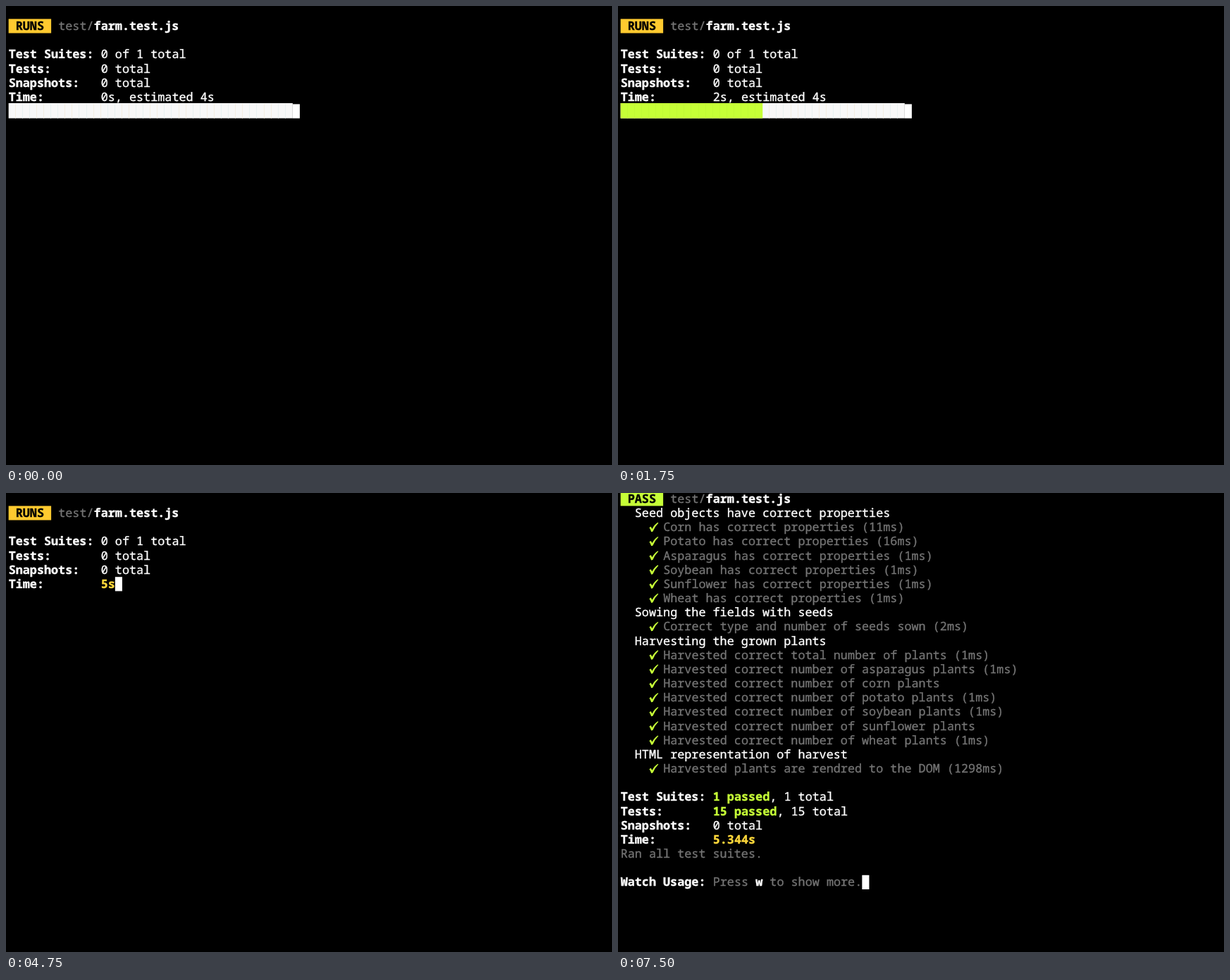
Recreate the animation shown at these times as an HTML page. Size 860 px wide and 652 px high, loop 8 s.

```html
<!DOCTYPE html>
<html lang="en">
<head>
<meta charset="utf-8">
<title>Test run</title>
<style>
  html, body { margin: 0; width: 100%; height: 100%; overflow: hidden; background: #000; }
  svg { display: block; width: 100vw; height: 100vh; color: #fff; }
  text { font: 16.8px "Noto Sans Mono", "DejaVu Sans Mono", monospace;
         fill: currentColor; stroke: currentColor; stroke-width: .35px;
         text-rendering: geometricPrecision; font-variant-ligatures: none; white-space: pre; }
  .b { font-weight: 700; }
  .dim { color: #747474; }
  .green { color: #c6ff37; }
  .yellow { color: #ffd83b; }
  .ink { color: #000; }
</style>
</head>
<body>
<svg id="term" viewBox="0 0 860 652"></svg>
<script>
const LOOP = 8000, CELL = 10.08, LINE = 20.17, LEFT = 3.65, TOP = -1.8, ASCENT = 15.7;
const GREEN = '#c6ff37', YELLOW = '#ffca2f';
const TICK = 'M.4 10.8L2.6 9.2L4.5 12.4Q7.6 6.4 12.6 3.3L13.3 4.1Q8.2 9.2 5.4 16.1L3.2 16.6Q2.2 13 .4 10.8Z';
const term = document.getElementById('term');

const colX = c => LEFT + c * CELL;
const rowY = r => TOP + r * LINE;

const text = (col, row, str, cls = '') =>
  `<text class="${cls}" x="${colX(col).toFixed(2)}" y="${(rowY(row) + ASCENT).toFixed(2)}">${str}</text>`;
const rect = (x, y, w, h, fill) =>
  `<rect x="${x.toFixed(2)}" y="${y.toFixed(2)}" width="${w.toFixed(2)}" height="${h.toFixed(2)}" fill="${fill}"/>`;
const cells = (col, row, n, fill) => rect(colX(col), rowY(row), n * CELL, LINE, fill);
const cursor = (col, row) => cells(col, row, 1, '#fff');
const check = (col, row) =>
  `<path d="${TICK}" fill="${GREEN}" transform="translate(${colX(col).toFixed(2)} ${rowY(row).toFixed(2)})"/>`;

const header = (row, label, fill) =>
  cells(0, row, 6, fill) + text(1, row, label, 'b ink') +
  text(7, row, 'test/', 'dim') + text(12, row, 'farm.test.js', 'b');

const labels = row => ['Test Suites:', 'Tests:', 'Snapshots:', 'Time:']
  .map((s, i) => text(0, row + i, s, 'b')).join('');

function progress(done) {
  const y = 138, h = 21.5;
  let out = rect(LEFT, y, 40 * CELL, h, '#f8f8f8');
  if (done) out += rect(LEFT, y, done * CELL, h, GREEN);
  // faint seams between the block characters
  for (let i = 1; i < 40; i++) {
    const seam = i < done ? '#c0fa36' : i % 4 < 2 ? '#f4eee3' : '#e9f1f1';
    if (i !== done) out += rect(Math.round(colX(i)) - 1, y + 1, 1, h - 1, seam);
  }
  return out + cursor(40, 7);
}

function running(sec) {
  const out = header(1, 'RUNS', YELLOW) + labels(3) +
    text(13, 3, '0 of 1 total') + text(13, 4, '0 total') + text(13, 5, '0 total');
  if (sec < 4) return out + text(13, 6, sec + 's, estimated 4s') + progress(sec * 10);
  return out + text(13, 6, sec + 's', sec > 4 ? 'b yellow' : '') + cursor(15, 6);
}

const prop = (name, ms) => `${name} has correct properties (${ms}ms)`;
const crop = (name, timed) => `Harvested correct number of ${name} plants${timed ? ' (1ms)' : ''}`;
const groups = [
  ['Seed objects have correct properties',
    prop('Corn', 11), prop('Potato', 16), prop('Asparagus', 1),
    prop('Soybean', 1), prop('Sunflower', 1), prop('Wheat', 1)],
  ['Sowing the fields with seeds', 'Correct type and number of seeds sown (2ms)'],
  ['Harvesting the grown plants',
    'Harvested correct total number of plants (1ms)',
    crop('asparagus', true), crop('corn'), crop('potato', true),
    crop('soybean', true), crop('sunflower'), crop('wheat', true)],
  ['HTML representation of harvest', 'Harvested plants are rendred to the DOM (1298ms)']
];

function passed() {
  let row = 1, out = header(0, 'PASS', GREEN);
  for (const [title, ...tests] of groups) {
    out += text(2, row++, title);
    for (const test of tests) {
      out += check(4, row) + text(6, row++, test, 'dim');
    }
  }
  return out + labels(21) +
    text(13, 21, '1 passed', 'b green') + text(21, 21, ', 1 total') +
    text(13, 22, '15 passed', 'b green') + text(22, 22, ', 15 total') +
    text(13, 23, '0 total') + text(13, 24, '5.344s', 'b yellow') +
    text(0, 25, 'Ran all test suites.', 'dim') +
    text(0, 27, 'Watch Usage:', 'b') + text(13, 27, 'Press', 'dim') +
    text(19, 27, 'w', 'b') + text(21, 27, 'to show more.', 'dim') + cursor(34, 27);
}

let shown = -1;
function draw(t) {
  // the clock ticks a quarter second early; the report replaces it at 5 s
  const step = t >= 5000 ? 6 : Math.floor((t + 250) / 1000);
  if (step === shown) return;
  shown = step;
  term.innerHTML = step === 6 ? passed() : running(step);
}

const start = performance.now();
function tick() {
  draw((performance.now() - start) % LOOP);
  requestAnimationFrame(tick);
}
tick();
</script>
</body>
</html>
```
